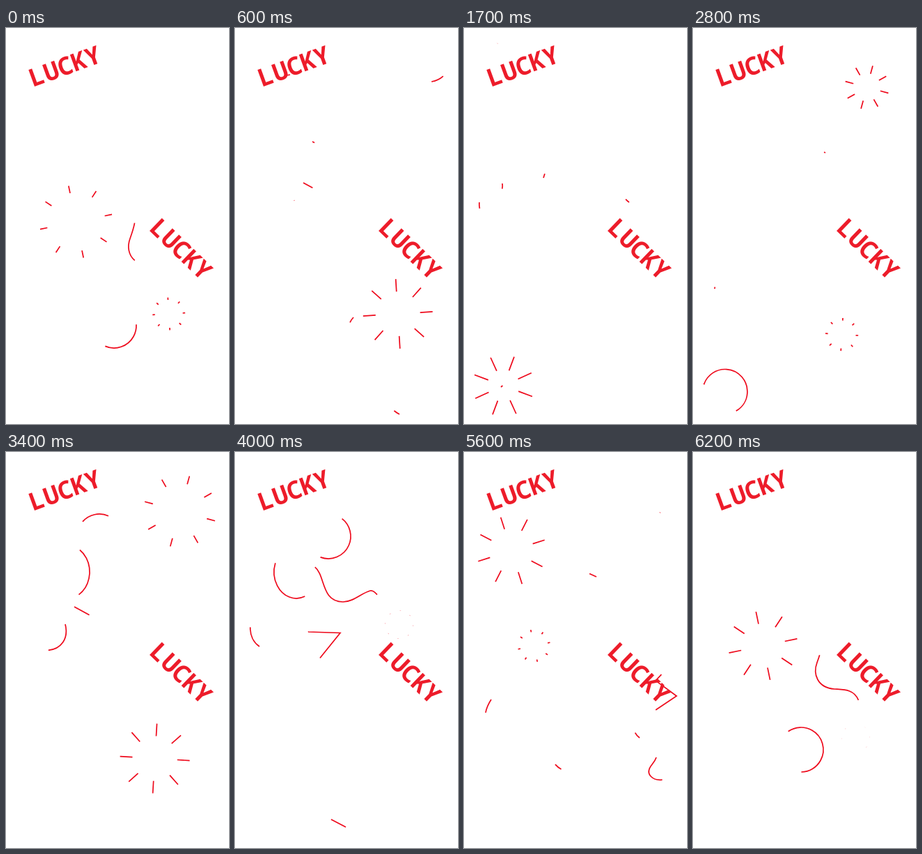
Recreate the animation shown at these times as an HTML page. Size 320 px wide and 568 px high, loop 6400 ms.

```html
<!DOCTYPE html>
<html lang="en">
<head>
<meta charset="utf-8">
<title>Lucky</title>
<style>
  html, body { margin: 0; height: 100%; overflow: hidden; background: #fff; }
  svg { display: block; width: 100%; height: 100%; }
  path { fill: none; stroke: #ee0a1c; stroke-width: 1.7; }
  text { font: bold 35.6px "Noto Sans Mono", monospace; text-anchor: middle; fill: #ed1c2a; }
</style>
</head>
<body>
<svg viewBox="0 0 320 568">
  <g id="strokes"></g>
  <text transform="translate(41 84) rotate(-20)" x="7.5 30 51 72.5 93.3">LUCKY</text>
  <text transform="translate(206 291) rotate(44)" x="7.5 30 51 72.5 93.3">LUCKY</text>
</svg>
<script>
const LOOP = 6400, STEP = 100, LAST_STEP = 62;
const STROKE = { headTime: 1150, tailDelay: 430, tailTime: 870 };
const BURST = { headTime: 1400, tailDelay: 450, tailTime: 1000 };
const layer = document.getElementById('strokes');
const trims = [];

const clamp = v => Math.min(1, Math.max(0, v));
const smooth = v => { v = clamp(v); return v * v * (3 - 2 * v); };

// cubic-bezier(.4, 0, .2, 1)
function swift(x) {
  x = clamp(x);
  let lo = 0, hi = 1;
  for (let i = 0; i < 20; i++) {
    const s = (lo + hi) / 2, q = 1 - s;
    if (1.2 * q * q * s + 0.6 * q * s * s + s ** 3 < x) lo = s; else hi = s;
  }
  return lo * lo * (3 - 2 * lo);
}

function polar(cx, cy, rx, ry, degrees) {
  const a = degrees * Math.PI / 180;
  return `${cx + rx * Math.cos(a)},${cy + ry * Math.sin(a)}`;
}

function addTrim(d, start, timing = STROKE, parts = 1) {
  const path = document.createElementNS('http://www.w3.org/2000/svg', 'path');
  path.setAttribute('d', d);
  path.setAttribute('pathLength', parts);
  layer.append(path);
  trims.push({ path, start, ...timing });
}

function addBurst(cx, cy, tilt, start) {
  let d = '';
  for (let i = 0; i < 8; i++) {
    const a = tilt - 90 + i * 45;
    d += `M${polar(cx, cy, 20, 20, a)}L${polar(cx, cy, 54, 54, a)}`;
  }
  addTrim(d, start, BURST, 8);
}

function addRing(cx, cy, angle, clockwise, start, ry = 32) {
  const from = polar(cx, cy, 32, ry, angle), to = polar(cx, cy, 32, ry, angle + 180);
  const arc = `A32,${ry} 0 0 ${clockwise} `;
  addTrim(`M${from}${arc}${to}${arc}${from}`, start);
}

const addPath = (d, ...starts) => starts.forEach(start => addTrim(d, start));

addBurst(100.5, 278, -11.7, 5350);
addBurst(233.7, 410, -3.5, 6150);
addBurst(56.5, 513, -24.5, 1063);
addBurst(249.5, 85, 15.3, 2388);
addBurst(213.6, 439.6, 3.4, 2545);
addBurst(235.6, 247.5, 4.9, 3920);
addBurst(68, 141.5, -17.8, 4745);

addRing(155, 427, 119, 1, 5440);
addRing(46, 521.5, 94, 1, 2060);
addRing(134, 121, -66, 0, 3130);
addRing(88, 172, 59, 0, 3070, 38);

// Waves and arcs
addPath('M252,410C238,400 246,385 239,361C234,340 218,341 203,340C178,338 172,318 178,302C182,291 184,284 185,277', 5440);
addPath('M111,163C131,171 121,215 155,215C170,215 182,202 194,199S222,240 237,250', 500, 3490);
addPath('M55,223C56,230 54,234 51,237C44,247 24,252 24,273C24,300 48,300 57,311C72,330 36,345 31,374', 1560, 4480);
addPath('M85,247C92,275 70,290 43,283C28,278 21,264 22,250', 550, 3015);
addPath('M282,77C302,73 309,58 308,44C306,20 284,8 258,18', 350);
addPath('M261,35C266,20 272,13 278,15C300,22 307,50 292,75C289,80 285,84 281,87', 4340);
addPath('M79,67C55,72 20,50 48,22', 430);
addPath('M170,415C150,436 185,455 160,470S115,470 125,446', 420);
addPath('M236,554C212,542 205,505 180,515S150,560 125,545S75,495 53,515', 460);
addPath('M264,423C272,420 285,430 270,448S280,475 291,468', 4850);

// Zigzags
addPath('M98,222L138,244L105,258L151,259.5L116,303', 410, 3170);
addPath('M114,215L121,192L148,202L138,155L190,179', 1560, 4440);
addPath('M159,538L130,523L165,500L128,485L138,458', 3750);
addPath('M301,393L275,370L305,350L275,328L293,309', 4880);

function draw(now) {
  const t = Math.min(LAST_STEP, Math.floor(now % LOOP / STEP)) * STEP;
  for (const { path, start, headTime, tailDelay, tailTime } of trims) {
    const age = (t - start + LOOP) % LOOP;
    const head = swift(age / headTime), tail = smooth((age - tailDelay) / tailTime);
    const shown = head - tail > 0.002;
    path.style.display = shown ? '' : 'none';
    if (shown) path.style.strokeDasharray = `0 ${tail} ${head - tail} 2`;
  }
}

const begin = performance.now();
function tick() {
  draw(performance.now() - begin);
  requestAnimationFrame(tick);
}
tick();
</script>
</body>
</html>
```
